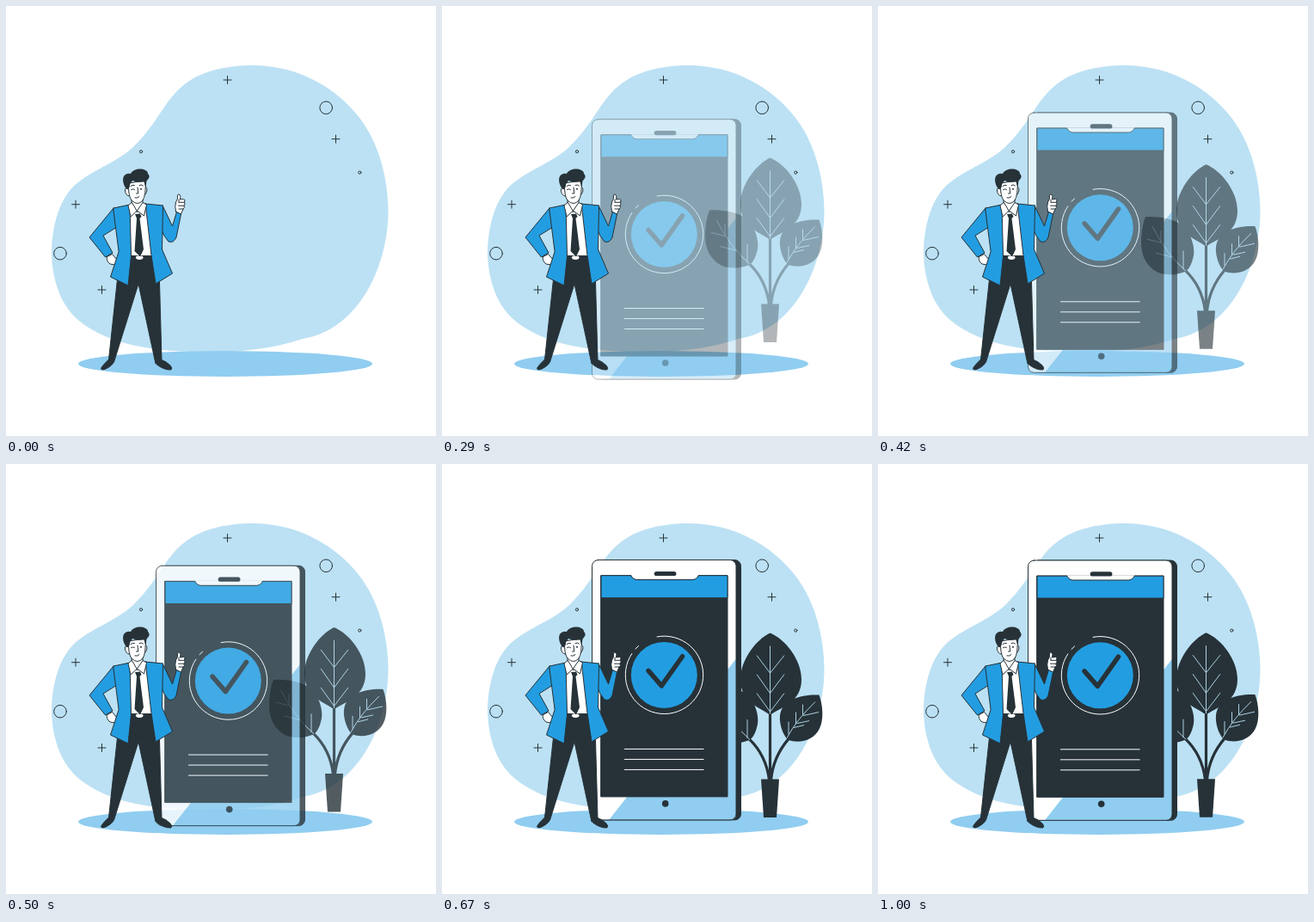
These frames come from a looping animation (500x500 px, 1.04 s). An HTML page:

```html
<!DOCTYPE html>
<html lang="en">
<head>
<meta charset="utf-8">
<title>Approved on phone</title>
<style>
html, body { margin: 0; width: 100%; height: 100%; overflow: hidden; background: #fff; }
svg { display: block; width: 100%; height: 100%; }
.dark { fill: #263238; }
.blue { fill: #239de1; }
.white { fill: #fff; }
.line { stroke: #263238; stroke-width: 1; stroke-linejoin: round; stroke-linecap: round; }
.open { fill: none; }
.vein { fill: none; stroke: #bce1f4; stroke-width: .9; }
.stem { fill: none; stroke: #263238; stroke-width: 3.2; }
.mark { fill: none; stroke: #fff; stroke-width: 1; }
</style>
</head>
<body>
<svg viewBox="0 0 500 500">
  <path fill="#bce1f4" d="M286 69C340 69 384 95 411 130C434 160 444 200 444.500 238C444.500 300 412 376 345 387C310 399 270 402.500 235 402.500C175 402 120 395 85 366C62 347 53 315 53 284C54 255 62 222 84 205C104 189 130 181 148 164C180 132 183 110 209 90C230 74 262 69 286 69Z"/>
  <ellipse cx="255" cy="416" rx="171" ry="14.900" fill="#90cdf0"/>

  <g class="line open">
    <path d="M253 86h9m-4.500-4.500v9M379 154.700h9m-4.500-4.500v9M76.500 230.700h9m-4.500-4.500v9M107 330h9m-4.500-4.500v9"/>
    <circle cx="372.200" cy="118.300" r="7.300"/>
    <circle cx="63" cy="287.700" r="7.300"/>
    <circle cx="157" cy="169.300" r="1.600"/>
    <circle cx="411.300" cy="193.600" r="1.600"/>
  </g>

  <g id="plant">
    <path class="stem" d="M381.500 288V367M357 319Q377 338 380.500 367M403 319Q385 340 382.500 367"/>
    <path class="dark" d="M371 366H392L389 410.500H374Z"/>
    <path class="dark" d="M381.500 196C366 203 347 227 347 250C347 274 365 281 381.500 291C399 281 418 274 418 250C418 227 399 203 381.500 196Z"/>
    <path class="vein" d="M381.500 211V290M366 222L381.500 242.500L398 222M366 244L381.500 266L398 244M366 266L381.500 287.500L398 266"/>
    <path class="dark" d="M311 257C327 256 345 259 355 268C365 277 370 296 366 306C364 314 360 320 356 321C346 325 331 326 321 319C310 311 306 299 306 287C306 276 308 264 311 257Z"/>
    <path class="vein" d="M319 268Q335 300 358 320M313 283L329 287M323 299L343 304M329 273V287M355 296.500V318"/>
    <path class="dark" d="M438.500 268C443 280 444 297 439 307C432 322 414 325 402 320C396 314 392 301 393 292C395 273 419 267 438.500 268Z"/>
    <path class="vein" d="M401 318Q412 297 434 276M403 299V314M411.500 288V302M419.500 279V291M409 306L421 303M413 301L427 298M420 292L438 288"/>
  </g>

  <g id="phone">
    <rect class="dark line" x="180" y="112.200" width="167.500" height="302.300" rx="7"/>
    <rect class="white" x="174.500" y="112.200" width="167.500" height="302.300" rx="7"/>
    <path fill="#90cdf0" d="M342 227V407.500Q342 414.500 335 414.500H194Z"/>
    <rect class="line open" x="174.500" y="112.200" width="167.500" height="302.300" rx="7"/>
    <rect class="dark line" x="185" y="130.300" width="147" height="257.200"/>
    <path class="blue line" d="M185 156V130.300H219.500C222 134 224 135.200 228 135.200H290C294 135.200 296 134 298.500 130.300H332V156Z"/>
    <path class="white" d="M220 129.700H298C296 134 294 134.700 290 134.700H228C224 134.700 222 134 220 129.700Z"/>
    <rect class="dark" x="246.700" y="125.500" width="25.700" height="5.200" rx="2.600"/>
    <circle class="dark" cx="259.700" cy="395.500" r="3.800"/>
    <path class="mark" d="M249.700 201.600A45.200 45.200 0 1 1 221 220.700M224.700 215.800L228.900 211.800"/>
    <circle class="blue" cx="258.300" cy="246" r="38.500"/>
    <path class="open" stroke="#263238" stroke-width="5.500" stroke-linecap="round" stroke-linejoin="round" d="M240 241L255.300 258.500L279.500 224.300"/>
    <path class="mark" d="M212 332h92.500M212 344h92.500M212 356h92.500"/>
  </g>

  <g id="man">
    <path class="dark line" d="M119.500 411L125.500 413.500Q124 418 116 422Q111 424 110.500 421.500Q112 418 119.500 411ZM174.500 412.500L181 411.500Q186 413 191 418Q194 422 191.500 423Q184 423.500 175.500 417Z"/>
    <path class="dark line" d="M143 289H170L178.500 321L181 412.500L174 416L154 323L125.500 414L119.500 411L129.500 318Z"/>
    <path class="white line" d="M144 231L163 230L170 290.500H144Z"/>
    <ellipse class="white" cx="155.200" cy="292.600" rx="4.300" ry="2.300"/>
    <path class="dark" d="M150 242L156 241.500L157.500 245L155.500 247L160 283L156 291.500L149.500 285L152 247Z"/>

    <path class="blue line" d="M125 235L97 269L115.500 292L124 287L113 267L129 257Z"/>
    <path class="white line" d="M117.500 291.500L123.500 288.500L129 295L130 299Q125 302 121 300Q116 296 117.500 291.500Z"/>
    <path class="blue line" d="M125 235L144 231L145.500 291L142 325L121.500 315L131 286Z"/>
    <path class="blue line" d="M182 232L193.500 256L198.500 239L203.500 242L198 269Q195 276 189 274Q183 267 181 261Z"/>
    <path class="blue line" d="M162.500 230L182.500 232L181.500 283L193.500 311L174 323L169 290Z"/>

    <path class="white line" d="M146 225V231L152.500 240L159 230V224Z"/>
    <path class="white line" d="M146 228.500L142 232L145 245L152.500 238L160.500 244L163.500 231L159 228.500L152.500 238Z"/>

    <path class="white line" d="M142.500 212Q138 210 138.500 215Q139.500 221 143.500 221ZM161.500 211Q164.500 210 163.800 215Q163 219.500 160.500 220Z"/>
    <path class="white line" d="M142.500 206L162 203Q163 220 159 226Q153 233 146 226Q142 221 142.500 206Z"/>
    <path class="dark" d="M139.500 212C135 206 135 198 139 196Q142 194 145 195C147 190 157 188 162 191Q165 192 165 195Q168 198 165.500 201Q163 205 159 204.500Q152 205.500 147 203Q144 206 143.500 211Q141 215 139.500 212Z"/>
    <path class="dark" d="M160 203L163.500 203L162.500 211Z"/>
    <path class="line open" stroke-width=".8" d="M145 209.500Q147 207.500 149.500 208.500M155 208.500Q157.500 207 159.500 209M145.500 213.500Q147.500 212 149.500 213.500M153 211L153.800 218H151.500M150 223Q153 224 155 221.500"/>
    <circle class="dark" cx="157" cy="212.800" r="1"/>

    <path class="white line" d="M197.500 239L203.500 242L206 236Q208 235 207 232Q209 230 207.500 228Q209 225 206.500 224.500L202.500 225Q203.500 221 202 219.500Q199.500 218 199.500 221Q200 225 197.500 228Q196 233 197.500 239Z"/>
    <path class="line open" stroke-width=".8" d="M201 228.300H207.500M200.500 232.200H207M201 236H206M201 225V228"/>
  </g>
</svg>
<script>
const LOOP = 1040, STEP = 1000 / 24, LAST = 24;
const ENTER_START = 1, ENTER_END = 14, BOB_STEPS = 11;
const plant = document.getElementById('plant');
const phone = document.getElementById('phone');

const entry = step => {
  const u = Math.min(1, Math.max(0, (step - ENTER_START) / (ENTER_END - ENTER_START)));
  return u ** 1.36;
};

const bob = step => step <= ENTER_END ? 0
  : 1 - Math.cos(2 * Math.PI * (step - ENTER_END) / BOB_STEPS);

function place(node, dy, opacity) {
  node.setAttribute('transform', `translate(0 ${dy.toFixed(3)})`);
  node.setAttribute('opacity', opacity.toFixed(4));
}

// Phone and plant enter from opposite directions, then bob in mirror.
function draw(ms) {
  const step = Math.min(LAST, Math.floor((ms % LOOP + 5) / STEP));
  const shown = entry(step);
  const dy = 30 * (1 - shown) - bob(step);
  place(phone, dy, shown);
  place(plant, -dy, shown);
}

const start = performance.now();
function tick() {
  draw(performance.now() - start);
  requestAnimationFrame(tick);
}
tick();
</script>
</body>
</html>
```
